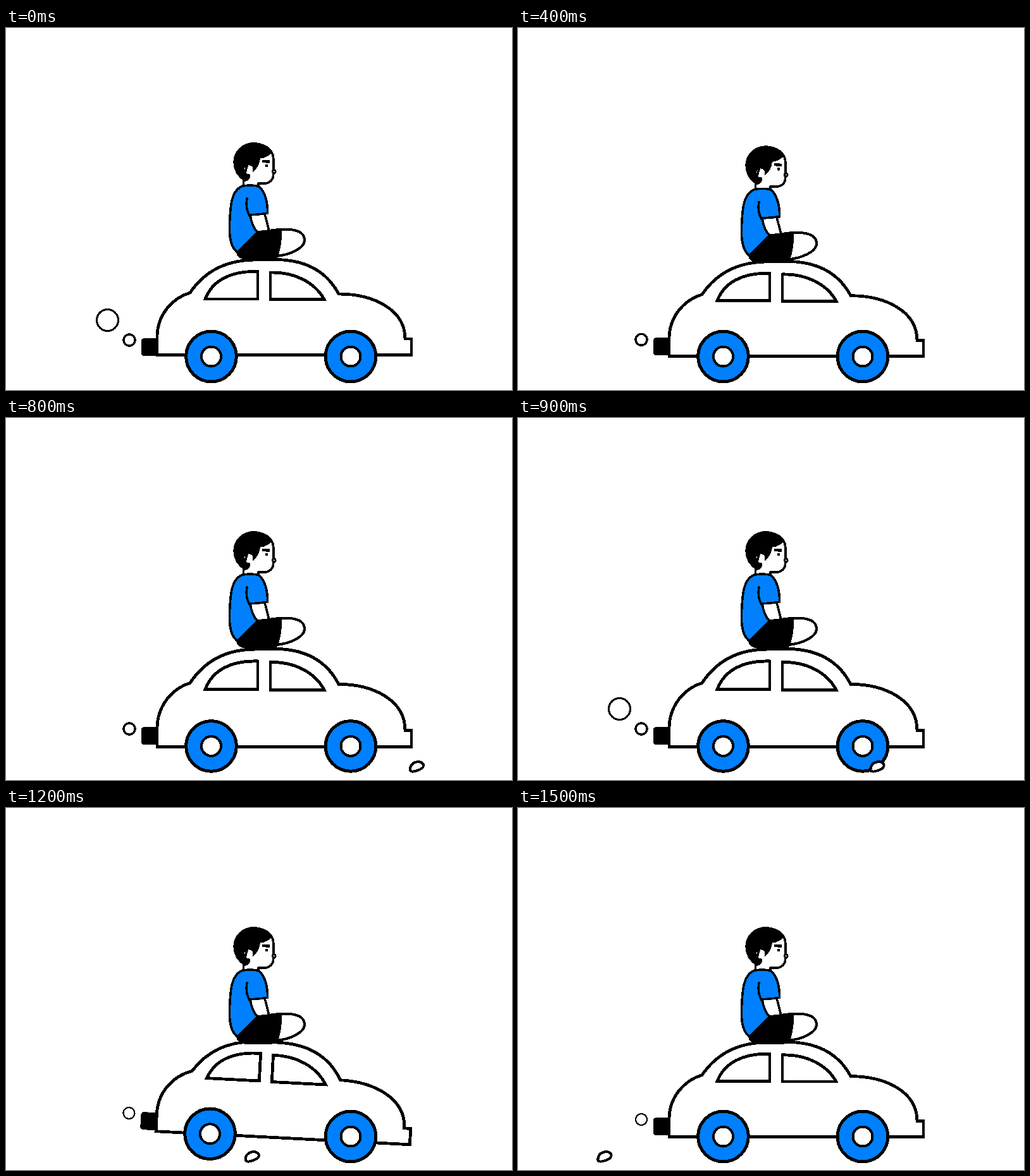
An HTML page for the animation above (1.6 s loop, 800 px wide and 573 px high).

```html
<!DOCTYPE html>
<html lang="en">
<head>
<meta charset="utf-8">
<title>Car ride</title>
<style>
  html, body { margin: 0; width: 100%; height: 100%; overflow: hidden; background: #fff; }
  svg { display: block; width: 100vw; height: 100vh; }
  .ink { fill: #000; stroke: none; }
  .blue { fill: #0080ff; }
</style>
</head>
<body>
<svg viewBox="0 0 800 573" fill="#fff" stroke="#000" stroke-width="4" stroke-linejoin="round" stroke-linecap="round" shape-rendering="crispEdges">
  <defs>
    <g id="wheel">
      <circle class="blue" r="39.8" stroke-width="5"/>
      <circle r="15.5"/>
    </g>
  </defs>

  <g id="car" stroke-width="4.8">
    <g id="body" stroke-linejoin="miter">
      <path d="M239 517.5V492C238 455 262 428 291 419C312 388 345 367 395 367L425 366.5C475 366.5 508 387 526 421C580 421 631 445 631 492H641V517.5Z"/>
      <path d="M315 429H398V385.5C355 384 326 400 315 429Z"/>
      <path d="M418 387V429.5H503C488 402 455 386 418 387Z"/>
    </g>
    <g id="exhaust">
      <path class="ink" d="M219 491H238L241 519H219Q214 519 214 514V496Q214 491 219 491Z"/>
      <circle id="puff" cx="195" cy="494" r="9"/>
      <circle id="cloud" cx="160.5" cy="462.5" r="17" stroke-width="3"/>
    </g>
  </g>

  <use id="rear" href="#wheel"/>
  <use id="front" href="#wheel"/>
  <path id="stone" d="M2 557.5C1 551 6 545.5 12 544.5C18 543 24 546.5 23 551C22 555.5 16 557.5 10 559C6 560 3 560 2 557.5Z"/>

  <g id="rider" stroke-width="3.6">
    <path d="M416 321C440 317 472 316 472 336C472 349 448 359 428 361" stroke-width="4"/>
    <path d="M386 296C388 308 392 318 398 323L416 321L409 294Z"/>
    <path class="ink" d="M398 322L436 318.5C437 336 434 350 430 362C428 367 420 367 405 367H380C372 367 365 362 364 356Z"/>
    <path d="M376 236L375 254H400L398.5 246H408C417 246 422.7 240 422.7 232V206C422 192 408 183 391 183Z"/>
    <circle cx="423.8" cy="227.3" r="2.4" stroke-width="2.8"/>
    <path class="ink" d="M391 181A32 31.5 0 0 0 359.3 212C359.3 226 367 238 378 243C383 242 386 239 386 233L385 231C379 232 377 227 377 223C378 216 387 215 390 221V228C398 222 401 215 402 206.5C409 206 415 203 418 199L423 202C418 187 404 181 391 181Z"/>
    <path class="ink" d="M404.500 208.500L417 209.500V214L404.500 213Z"/>
    <circle class="ink" cx="412" cy="218" r="2.5"/>
    <path class="blue" d="M372 251C378 248.500 394 248.500 400 251C409 258 414 275 413.500 293.500L386 296C388 308 392 318 398 323L366 355C351 345 353 315 354 300C355 280 357 258 372 251Z"/>
    <path d="M381 270C379 280 381 290 385 297" fill="none"/>
  </g>
</svg>
<script>
  const STEP = 100, STEPS = 16;
  const el = id => document.getElementById(id);
  const transform = (id, value) => el(id).setAttribute('transform', value);
  const move = (id, x, y) => transform(id, `translate(${x} ${y})`);
  const show = (id, on) => el(id).setAttribute('visibility', on ? 'visible' : 'hidden');

  // The stone slows down while it passes beneath the wheels.
  const stonePath = [[7, 738], [8, 637], [10, 474], [13, 328], [15, 124.5]];

  function along(points, step) {
    const next = Math.max(1, points.findIndex(point => point[0] >= step));
    const [t0, x0] = points[next - 1], [t1, x1] = points[next];
    return x0 + (x1 - x0) * (step - t0) / (t1 - t0);
  }

  function draw(step) {
    const landed = step >= 12;
    const rise = step > 6 && !landed ? 1 : 0;
    const swing = step <= 6 ? Math.sin(Math.PI * step / 6) ** 2 : 0;
    const bump = Math.max(0, 1 - Math.abs(step - 13) / 2);
    const dip = landed ? 1 - bump : swing;
    const roof = 4 * dip - rise;
    const chassis = 3 * Math.max(dip, rise);
    const stretch = 1 + (chassis - roof) / 150.5;

    move('rider', 0, 7 * (landed ? 1 : swing) - 2 * rise);
    transform('car', `translate(${-4.5 * bump} ${6.5 * bump}) rotate(${6 * bump} 440 518)`);
    transform('body', `translate(0 ${roof + 367 * (1 - stretch)}) scale(1 ${stretch})`);
    move('exhaust', 0, -dip - 2 * rise - 2 * bump);
    move('rear', 324.5 - 4 * bump, 520 - 0.6 * rise - 8.5 * bump);
    move('front', 545, 520 - 0.6 * rise);

    el('puff').setAttribute('stroke-width', landed ? 2.3 : 3.4);
    show('cloud', step <= 3 || (step >= 9 && !landed));
    show('stone', step >= 7);
    if (step >= 7) move('stone', along(stonePath, step), 0);
  }

  function tick() {
    draw(Math.floor(performance.now() / STEP) % STEPS);
    requestAnimationFrame(tick);
  }
  tick();
</script>
</body>
</html>
```
